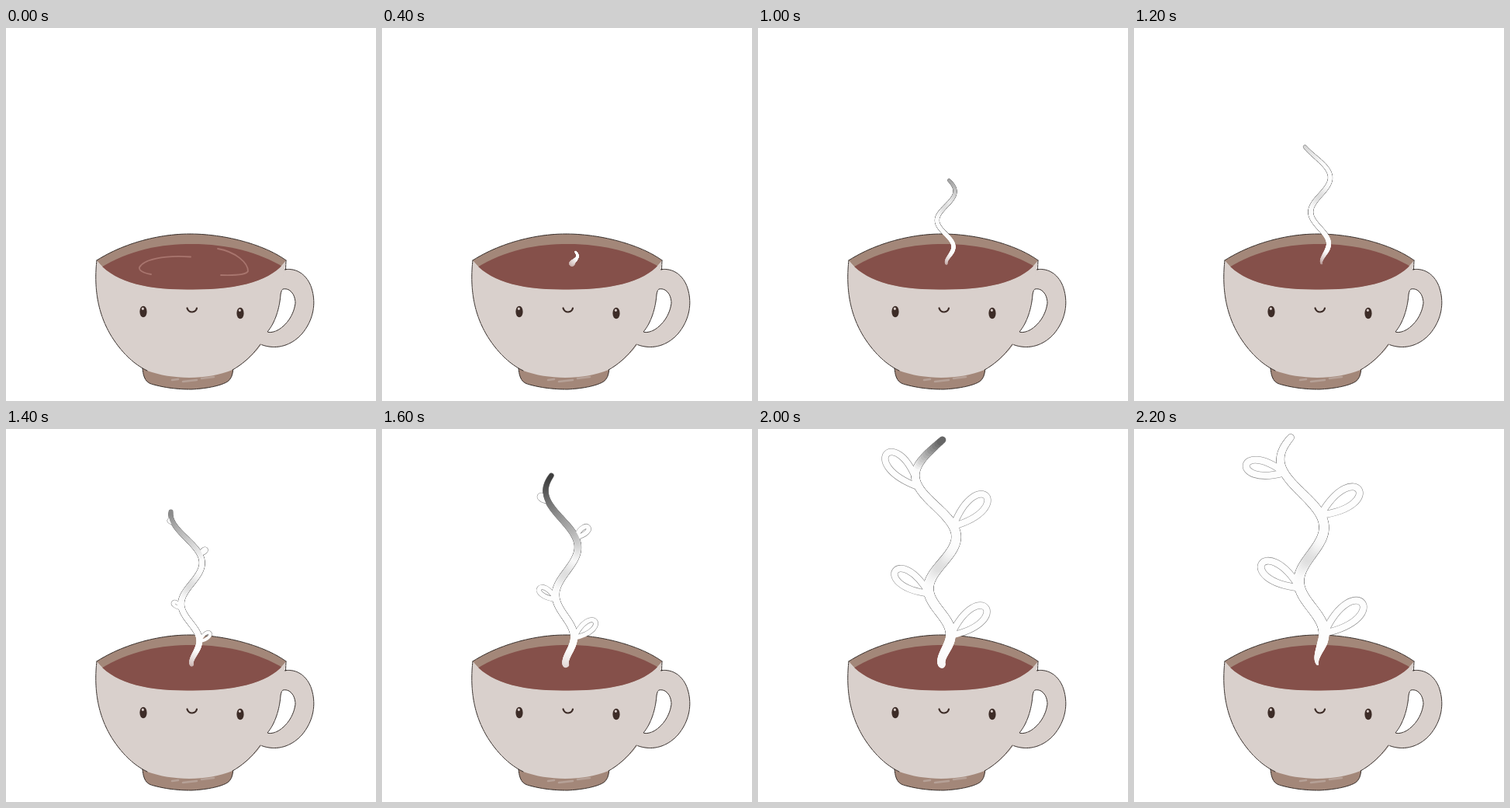
Recreate the animation shown at these times as an HTML page with a canvas. Size 477 by 480 pixels, loop 2300 ms.

```html
<!DOCTYPE html>
<html lang="en">
<head>
<meta charset="utf-8">
<title>Cup of tea</title>
<style>
  html, body { margin: 0; width: 100%; height: 100%; overflow: hidden; background: #fff; }
  canvas { display: block; }
</style>
</head>
<body>
<canvas id="stage" width="477" height="480"></canvas>
<script>
const ctx = document.getElementById('stage').getContext('2d');
const LOOP = 2300, STEP = 100;
const COFFEE = [133, 80, 74], CLAY = '#a38779', CREAM = '#d9d0cc', DARK = '#3d2c27', LINE = '#241c19';
const DASH = [5, 1, 3, .7];

const lerp = (a, b, k) => a + (b - a) * k;
const clamp = v => Math.max(0, Math.min(1, v));
const mix = (a, b, k) => a.map((v, i) => lerp(v, b[i], k));
const rgb = c => `rgb(${c.map(Math.round).join(',')})`;

// The steam is a wave rising from SURFACE; u counts its half waves.
const SURFACE = 303, POWER = 1.35;
const JOINTS = [1, 1.95, 3.2, 3.85];
const poses = [
  { t: 400, top: 288, x: 249, rise: 10, lean: 1, sway: 0, width: 3.6, base: 2, soft: .5, dark: 0, fade: 1, leaf: 0, young: .2, curl: 0 },
  { t: 800, top: 239, x: 248, rise: 17, lean: 2, sway: 3, width: 4.4, base: .8, soft: .6, dark: .6, fade: 1.2, leaf: 0, young: .2, curl: 0 },
  { t: 1200, top: 153, x: 246, rise: 25, lean: 3, sway: 4, width: 6, base: .4, soft: .3, dark: .15, fade: .4, leaf: 0, young: .2, curl: 0 },
  { t: 1600, top: 60, x: 241, rise: 34, lean: 2, sway: 4.5, width: 9, base: .9, soft: .75, dark: .82, fade: 1.5, leaf: 27, young: .2, curl: 0 },
  { t: 2000, top: 14, x: 241, rise: 37, lean: 2.5, sway: 6, width: 12.5, base: .75, soft: .95, dark: .65, fade: .4, leaf: 45, young: .03, curl: .4 },
  { t: 2200, top: 11, x: 241, rise: 40, lean: 6, sway: 6, width: 13, base: .15, soft: .9, dark: 0, fade: .4, leaf: 49, young: 0, curl: -.45 }
];

function poseAt(t) {
  let i = 0;
  while (i < poses.length - 2 && t >= poses[i + 1].t) i++;
  const a = poses[i], b = poses[i + 1], k = clamp((t - a.t) / (b.t - a.t)), p = {};
  for (const key in a) p[key] = lerp(a[key], b[key], k);
  p.grow = Math.pow((SURFACE - p.top) / p.rise, 1 / POWER);
  return p;
}

function stemAt(p, u) {
  return [
    p.x - p.lean * u - (4 + p.sway * u) * Math.cos(Math.PI * u),
    SURFACE - p.rise * Math.pow(u, POWER)
  ];
}

function paint(d, fill, line) {
  const path = new Path2D(d);
  if (fill) { ctx.fillStyle = fill; ctx.fill(path); }
  if (line) {
    ctx.strokeStyle = line;
    ctx.lineWidth = .9;
    ctx.setLineDash(DASH);
    ctx.stroke(path);
    ctx.setLineDash([]);
  }
}

function brush(d, color, width) {
  ctx.strokeStyle = color;
  ctx.lineWidth = width;
  ctx.stroke(new Path2D(d));
}

function oval(x, y, rx, ry, color) {
  ctx.fillStyle = color;
  ctx.beginPath();
  ctx.ellipse(x, y, rx, ry, 0, 0, Math.PI * 2);
  ctx.fill();
}

function eye(x, y) {
  oval(x, y, 4.6, 7.3, DARK);
  oval(x - .6, y - 3.8, 1.5, 1.8, '#d9cdca');
}

const BACK = 'M117 299C150 278 195 265 237 265C285 265 335 280 361 299';
const FRONT = 'C343 325 302 337 237 336.500C175 337 137 325 117 299Z';
const SIDE = 'M117 299C112 345 122 385 152 418C164 431 174 437 182 441';

function drawCup() {
  paint('M176 438C177 448 179 455 187 458C204 463 221 465 239 465C258 464 274 461 284 456C291 452 292 446 293 438Z', CLAY, LINE);
  brush('M214 453L222 452M228 455L246 453M252 451L268 449', 'rgba(219,209,206,.35)', 2.5);
  paint('M358 311C374 308 387 317 393 332C401 354 396 376 382 393C368 409 348 415 328 407L345 378Z', CREAM, LINE);
  paint(SIDE + 'C215 453 260 453 292 440C318 426 334 405 344 382C352 362 355 335 361 299' + FRONT, CREAM);
  paint(SIDE, null, LINE);
  paint('M292 440C306 432 318 421 328 407M361 299L360.500 311', null, LINE);
  paint('M357 336C366 334 373 343 373 354C371 370 361 383 350 389Q341 393 337 391C348 378 353 358 354 343Q355 337 357 336Z', '#fff', LINE);
  paint(BACK + FRONT, CLAY);
  ctx.save();
  ctx.clip(new Path2D(BACK + FRONT));
  paint('M121 309C160 285 200 278 240 278C285 278 325 288 358 308L350 340H125Z', rgb(COFFEE));
  ctx.restore();
  paint(BACK, null, LINE);
  eye(177, 365);
  eye(302, 367);
  brush('M233.500 360.500Q235 365.500 240 365.500Q245 365 246 360.500', DARK, 2.2);
}

function drawSwirl(t) {
  const k = t / 400, s = lerp(1, .1, k);
  ctx.save();
  ctx.translate(lerp(242, 247, k), 303);
  ctx.scale(s, s);
  ctx.rotate(k * .5);
  ctx.translate(-242, -303);
  brush('M187 317Q171 314 172 308C177 298 203 292 238 294.500', '#a8756e', 1.8);
  brush('M273 284C296 288 312 302 312 313Q309 319 277 318', '#a8756e', 1.8);
  ctx.restore();
}

// Leaves alternate right and left; upper ones are younger and turn more.
function drawLeaf(p, i, extra, color) {
  const side = i % 2 ? -1 : 1, size = p.leaf * (1 - p.young * i);
  if (size < 3 || JOINTS[i] > p.grow) return;
  const lift = (i % 2 ? .65 : .8) + p.curl * Math.pow(i / 3, 3);
  const [x, y] = stemAt(p, JOINTS[i]);
  const dx = side * size, dy = -size * lift, long = 4 / 3, wide = .66;
  ctx.strokeStyle = color;
  ctx.lineWidth = 2.5 + p.leaf * .12 + extra;
  ctx.beginPath();
  ctx.moveTo(x, y);
  ctx.bezierCurveTo(x + dx * long - dy * wide, y + dy * long + dx * wide,
    x + dx * long + dy * wide, y + dy * long - dx * wide, x, y);
  ctx.stroke();
}

function steamTone(p, u) {
  const tip = p.dark * clamp((u - p.grow + p.fade) / p.fade);
  const band = .13 * Math.exp(-Math.pow((u - 2.55) / .2, 2));
  const c = mix([253, 253, 253], [20, 20, 20], Math.max(tip, band));
  return rgb(mix(COFFEE, c, lerp(p.soft, 1, clamp(u / .8))));
}

function drawSteam(p, edge) {
  const extra = edge ? 1.1 : 0, n = 140;
  JOINTS.forEach((u, i) => drawLeaf(p, i, extra, edge ? '#858585' : '#fdfdfd'));
  let last = stemAt(p, 0);
  for (let i = 1; i <= n; i++) {
    const u = p.grow * i / n, q = stemAt(p, u);
    const taper = lerp(p.base, 1, clamp(u / .8)) * (1 - .35 * Math.pow(i / n, 4));
    ctx.strokeStyle = edge ? '#777' : steamTone(p, u);
    ctx.lineWidth = p.width * taper + extra;
    ctx.beginPath();
    ctx.moveTo(...last);
    ctx.lineTo(...q);
    ctx.stroke();
    last = q;
  }
}

function draw(t) {
  ctx.fillStyle = '#fff';
  ctx.fillRect(0, 0, 477, 480);
  ctx.lineCap = ctx.lineJoin = 'round';
  const pose = t >= 400 ? poseAt(t) : null;
  // The cup covers the outline, so it only shows above the rim.
  if (pose) drawSteam(pose, true);
  drawCup();
  if (pose) drawSteam(pose, false);
  else drawSwirl(t);
}

const start = performance.now();
function tick() {
  const t = (performance.now() - start) % LOOP;
  draw(Math.floor(t / STEP) * STEP);
  requestAnimationFrame(tick);
}
tick();
</script>
</body>
</html>
```
